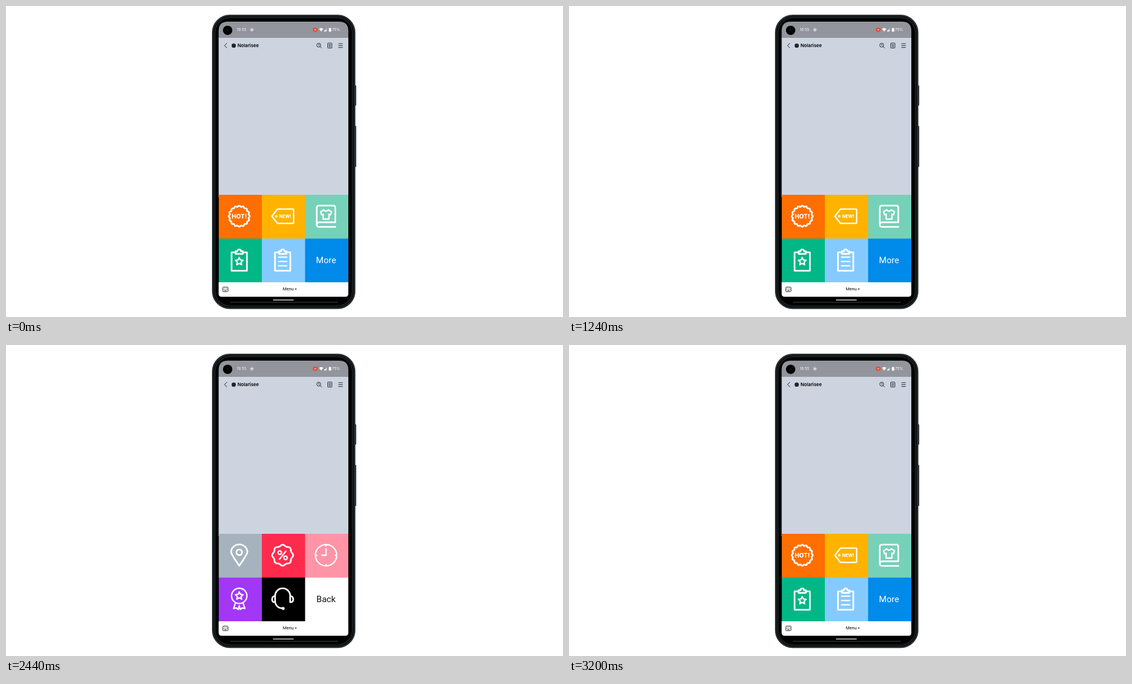
These frames come from a looping animation (960x537 px, 3240 ms). An HTML page:

```html
<!DOCTYPE html>
<html lang="en">
<head>
<meta charset="utf-8">
<style>
html, body { margin: 0; width: 100%; height: 100%; overflow: hidden; background: #fff; }
svg { display: block; width: 100vw; height: 100vh; }
text { font-family: Inter, sans-serif; }
.label { font: 15px Roboto, sans-serif; text-anchor: middle; }
.icon { fill: none; stroke: #fff; stroke-width: 2.8; stroke-linejoin: round; stroke-linecap: round; }
.icon text { fill: #fff; stroke: none; font-weight: 800; text-anchor: middle; }
.icon .thin { stroke-width: 2.3; }
.ui { fill: none; stroke: #22262b; stroke-width: 1; }
</style>
</head>
<body>
<svg viewBox="0 0 960 537">
  <!-- Phone body -->
  <path d="M600 137h2.5q1 0 1 1v33q0 1-1 1H600zM600 207h2.5q1 0 1 1v69q0 1-1 1H600z" fill="#1b1f21"/>
  <rect x="356.2" y="16.2" width="244.8" height="505.8" rx="29.5" fill="#0c0f10" stroke="#2b3032" stroke-width="2.4"/>
  <rect x="360.3" y="20.3" width="236.6" height="497.6" rx="26" fill="#000" stroke="#22282a" stroke-width="1.4"/>
  <path d="M386 511.5H572" stroke="#505456" stroke-width=".8"/>

  <!-- Screen -->
  <clipPath id="screen"><path d="M366.5 497V43q0-16 16-16H574q16 0 16 16V497q0 5-5 5H371.5q-5 0-5-5z"/></clipPath>
  <g clip-path="url(#screen)">
    <path d="M366 27H591V56H366z" fill="#92959c"/>
    <path d="M366 55H591V330H366z" fill="#cdd4e0"/>
    <g id="menus"></g>
    <path d="M366 477H591V503H366z" fill="#fff"/>
  </g>
  <rect x="460" y="506.9" width="36" height="1.4" rx=".7" fill="#fff"/>

  <!-- Status bar -->
  <circle cx="382" cy="42" r="8.1"/>
  <path d="M380.8 40.5l2 2.2" stroke="#555" stroke-width=".8"/>
  <g fill="#fff">
    <text x="398" y="43.3" font-size="6.4">10:55</text>
    <text x="562" y="43.3" font-size="6.6">75%</text>
    <circle cx="423.8" cy="41" r="1.5"/>
    <circle cx="423.8" cy="41" r="2.8" fill="none" stroke="#fff" stroke-width=".8" stroke-dasharray="1.3 .9"/>
    <path d="M539.5 39.6q3.7-3.2 7.4 0l-3.7 4.4z"/>
    <path d="M547.8 44l5.2-5.6V44z" opacity=".6"/>
    <path d="M547.8 44l2.8-3V44z"/>
    <path d="M556.5 38.6h1v-.8h2v.8h1V44.2h-4z"/>
  </g>
  <rect x="528.8" y="37.5" width="8.4" height="7" rx="3.4" fill="#e9472f"/>
  <path d="M531 41h4M533 39.3v3.4" stroke="#fff" stroke-width=".8" opacity=".8"/>

  <!-- Chat header -->
  <g class="ui">
    <path d="M381 64l-4.5 4.3 4.5 4.3"/>
    <circle cx="539" cy="67.6" r="3.4"/>
    <path d="M541.5 70.2l2.6 2.6M539 65.8v2h1.4"/>
    <rect x="554.5" y="64" width="7.2" height="8.6" rx=".8"/>
    <path d="M556.2 66.5h3.8M556.2 68.4h3.8M556.2 70.3h3.8" stroke-width=".9"/>
    <path d="M572.8 65.1h7.6M572.8 68.4h7.6M572.8 71.7h7.6"/>
  </g>
  <circle cx="392.5" cy="68.4" r="3.7" fill="#22262b"/>
  <text x="399" y="71.4" font-size="8" font-weight="600">Nolarisee</text>

  <!-- Bottom bar -->
  <g class="ui">
    <rect x="373.7" y="485.4" width="9" height="7.8" rx="1"/>
    <path d="M375.4 488h5.8M375.4 489.8h5.8" stroke-dasharray="1 1.4"/>
    <path d="M376.3 491.5h3.8" stroke-width=".8"/>
  </g>
  <text x="477" y="491.2" style="font:7.5px Roboto,sans-serif">Menu</text>
  <path d="M497.7 488h3.4l-1.7 2z"/>
</svg>
<script>
const LOOP = 3240, OPEN = 1280, CLOSE = 3200;
const WIDTH = 74.5, HEIGHT = 75.6, LEFT = 366.5, TOP = 326;

// Closed polar outline around the origin
const outline = (n, radius) => 'M' + Array.from({ length: n }, (_, i) => {
  const a = i * 2 * Math.PI / n - Math.PI / 2, r = radius(i, a);
  return (r * Math.cos(a)).toFixed(2) + ' ' + (r * Math.sin(a)).toFixed(2);
}).join('L') + 'z';
const path = (d, attrs = '') => `<path d="${d}" ${attrs}/>`;
const circle = (x, y, r, attrs = '') => `<circle cx="${x}" cy="${y}" r="${r}" ${attrs}/>`;
const wave = (lobes, r, depth) => path(outline(192, (i, a) => r + depth * Math.cos(lobes * a)));
const star = (y, r) => path(outline(10, i => i % 2 ? r * .48 : r), `class="thin" transform="translate(0 ${y})"`);
const label = (word, color) => `<text class="label" y="5.3" style="fill:${color};font-weight:400">${word}</text>`;

const clipboard = path('M-6-12.8H-13.2V19H13.2V-12.8H6')
  + path('M-6.3-10.2V-14.7H-3.2Q-2.8-17.8 0-17.8T3.2-14.7H6.3V-10.2z');

// Each tile: colour and icon drawn around the tile's icon centre
const menus = [
  [
    ['#ff6f00', wave(16, 17.3, .9) + '<text y="3.7" font-size="10.4">HOT!</text>'],
    ['#ffb300', path('M-18.5 0L-9-12.3H17.2Q19 -12.3 19-10.5V10.5Q19 12.3 17.2 12.3H-9z', 'class="thin"')
      + circle(-11, 0, 1.5, 'stroke-width="1.4"') + '<text x="4.5" y="2.5" font-size="7.4">NEW!</text>'],
    ['#76d1b9', path('M-12 10.5H16V-14.5Q16-18.3 12.2-18.3H-12Q-16-18.3-16-14.3V14.4A4 4 0 0 0 -12 18.4H16M-16 14.5A4 4 0 0 1 -12 10.5')
      + path('M-4-11L-9.5-7.5-7.5-2.5-5-3.5V5H5V-3.5L7.5-2.5 9.5-7.5 4-11Q0-6.5-4-11z', 'class="thin"')],
    ['#00b785', clipboard + star(3, 7)],
    ['#85caff', clipboard + path('M-7-4.5H7M-7 3H7M-7 10.5H7', 'class="thin"')],
    ['#008ae9', label('More', '#fff')]
  ],
  [
    ['#a6b3be', path('M0 18.2C-5 10.5-14-1.5-14-5.5A14 13.2 0 0 1 14-5.5C14-1.5 5 10.5 0 18.2z') + circle(0, -5, 4.9)],
    ['#ff2b4c', wave(8, 17, 1.1) + path('M5.5-7L-5.5 7', 'class="thin"')
      + circle(-5, -4.5, 3, 'class="thin"') + circle(5, 4.5, 3, 'class="thin"')],
    ['#ff94a7', circle(0, 0, 18.4, 'class="thin"')
      + path('M0-11V0H-7.5M0-18V-16M0 18V16M-18 0H-16M18 0H16', 'class="thin"')],
    ['#a237f8', circle(0, -5, 13.2, 'class="thin"') + star(-5, 7)
      + path('M-6.5 7.2L-9.8 16.8-5 15.8-1.8 18.5 0 12 1.8 18.5 5 15.8 9.8 16.8 6.5 7.2', 'class="thin"')],
    ['#000', path('M-13 6V-5A13 13 0 0 1 13-5V6M-13-5Q-18.2-4-18.2 1T-13 6M13-5Q18.2-4 18.2 1T13 6M-13 6Q-11 15.7 0 16.7')
      + circle(.8, 16.7, 1.2)],
    ['#fff', label('Back', '#111')]
  ]
];

// Tiles overlap the next ones by a pixel so that no seam shows between them
const tile = ([color, icon], i) => {
  const col = i % 3, row = i / 3 | 0;
  const x = LEFT + col * WIDTH, y = TOP + row * HEIGHT;
  const iconX = 402 + col * 74.8, iconY = row ? 438.2 : 363;
  return `<rect x="${x}" y="${y}" width="${WIDTH + 1}" height="${HEIGHT + 1}" fill="${color}"/>`
    + `<g class="icon" transform="translate(${iconX} ${iconY})">${icon}</g>`;
};

const holder = document.getElementById('menus');
holder.innerHTML = menus.map(m => `<g>${m.map(tile).join('')}</g>`).join('');
const [first, second] = holder.children;

function draw() {
  const t = performance.now() % LOOP, opened = t >= OPEN && t < CLOSE;
  first.style.display = opened ? 'none' : '';
  second.style.display = opened ? '' : 'none';
  requestAnimationFrame(draw);
}
draw();
</script>
</body>
</html>
```
